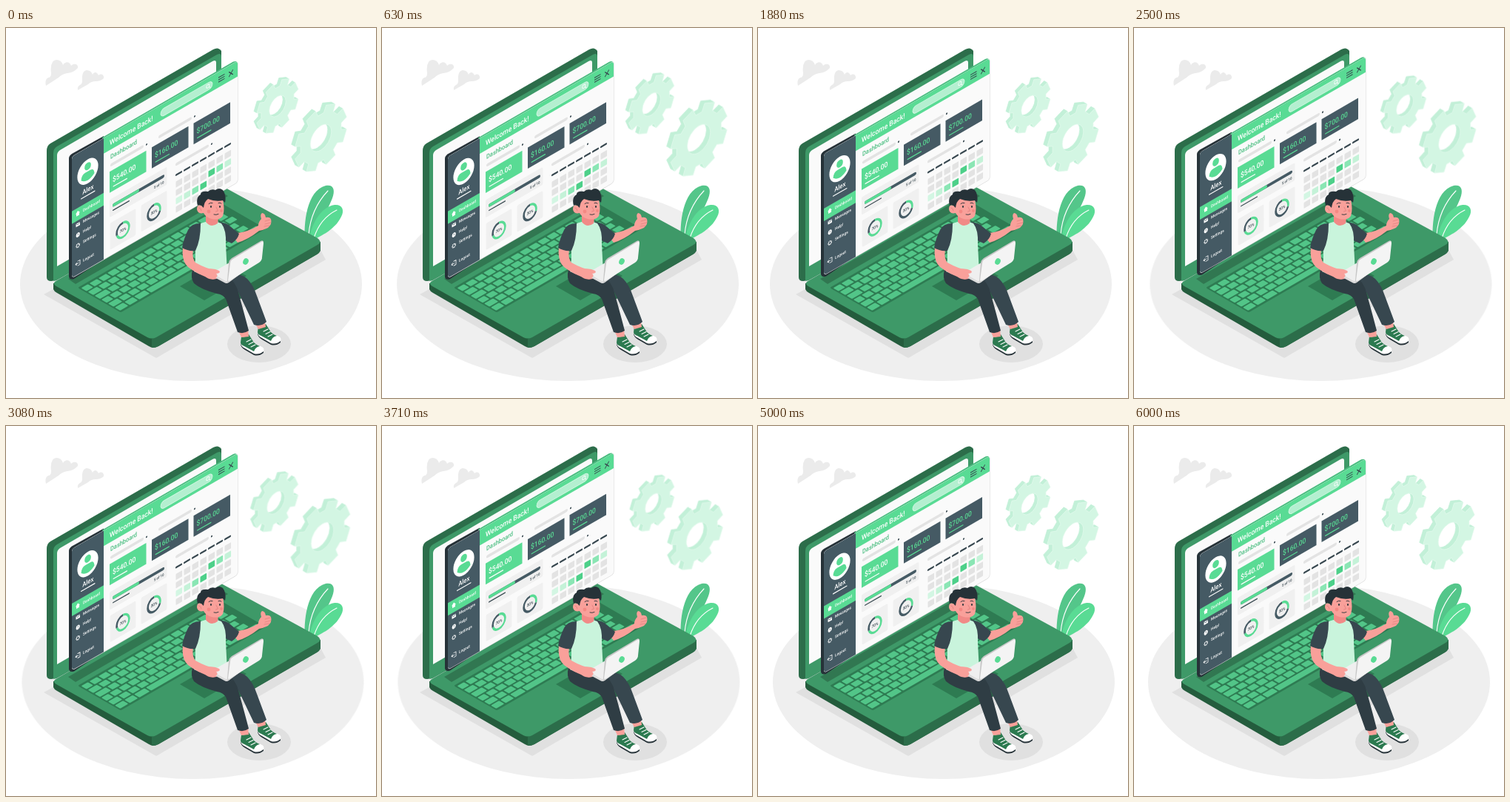
Write an HTML page that moves like this. It is 500x500 px and loops after 6040 ms.

```html
<!DOCTYPE html>
<html lang="en">
<head>
<meta charset="utf-8">
<title>Dashboard on a laptop</title>
<style>
  html, body { margin: 0; width: 100%; height: 100%; overflow: hidden; background: #fff; }
  svg { display: block; width: 100vw; height: 100vh; }
  text { font-family: Roboto, "Open Sans", sans-serif; font-weight: 500; }
  #gears { transform-origin: 397px 130px; }
  .line { fill: none; stroke-linecap: round; stroke-linejoin: round; }
</style>
</head>
<body>
<svg viewBox="0 0 500 500">
  <defs>
    <clipPath id="cardClip"><rect x="89" y="225" width="224" height="164" rx="4"/></clipPath>
  </defs>

  <ellipse id="floor" cx="250" cy="346" rx="231" ry="131" fill="#efefef"/>
  <path fill="#ebebeb" d="M54 78Q52 70 57 67Q61 67 61 61Q59 44 68 43Q75 43 77 50C80 45 86 45 88 51C92 47 98 49 97 54Q92 60 83 61Q76 62 71 67Z"/>
  <path fill="#ebebeb" d="M97 84Q96 79 100 77Q103 76 103 71Q102 58 109 57Q115 57 117 63C119 59 123 59 125 64C128 61 133 63 132 68Q128 72 121 72Q115 72 111 76Z"/>

  <g id="gears"></g>

  <!-- plant -->
  <path fill="#54c68a" d="M404 291C402 264 406 220 432 213C443 211 445 219 441 230C436 242 433 247 429 257C424 272 416 282 406 292Z"/>
  <path fill="#59db94" d="M409 291C411 268 424 242 444 239C454 238 458 246 453 255C449 263 445 267 439 272C430 280 422 281 412 290Z"/>
  <g class="line" stroke="#fff" stroke-width="1.1">
    <path d="M409 279C411 256 419 237 435 220"/>
    <path d="M416 284C421 268 431 254 447 246"/>
  </g>

  <!-- big laptop -->
  <path fill="#e0e0e0" d="M51 360L80 344L425 300L432 313L203 446Z"/>
  <path fill="#245c3d" d="M64 345V353Q65 356 69 358L193 430Q199 434 206 430L420 306Q425 303 425 299V289Z"/>
  <path fill="#2c6d4a" d="M197 420V432Q202 432 206 430L420 306Q425 303 425 299V289Z"/>
  <path fill="#3e9968" d="M69 341L291 213L421 284Q428 289 421 293L203 418Q197 421 191 418L68 349Q61 345 69 341Z"/>
  <path fill="#2c6d4a" d="M55 337V166Q55 159 60 156L280 29Q287 25 291 31V215L68 341L61 342Q55 342 55 337Z"/>
  <path fill="#3e9968" d="M64 341V169Q64 163 69 160L285 36Q291 33 291 39V215L68 341Q65 342 64 341Z"/>
  <path fill="#fafafa" d="M69 322V172Q69 168 73 165L279 45Q284 42 284 47V198Z"/>
  <path fill="#2c6d4a" d="M84 339L290 221L300 227L94 346Z" opacity=".75"/>
  <g id="keys" transform="matrix(1 -.577 1 .577 101 351)"></g>
  <path fill="#2e7b52" d="M235 349L292 316L325 335L268 368Z"/>

  <g id="card">
    <path fill="#263238" d="M85 336V176Q85 173 89 170L132 146V312L92 339Q86 341 85 336Z"/>
    <path fill="#48bd7f" d="M130 148L307 45.500Q312 43.500 313 48L132 153Z"/>
    <g transform="matrix(1 -.577 0 1 0 0)">
      <rect x="89" y="225" width="224.600" height="164.600" rx="4" fill="#dcdcdc"/>
      <g id="ui" clip-path="url(#cardClip)"></g>
    </g>
  </g>

  <!-- person -->
  <ellipse cx="342" cy="427" rx="43" ry="25" fill="#e0e0e0"/>
  <g id="shoes"></g>
  <path fill="#f9a09a" d="M314 409L327 407L328 417L318 418ZM337 400L350 397L351 404L341 407Z"/>
  <path fill="#37474f" d="M290 334Q316 329 326 339Q334 347 339 362L352 397Q345 404 335 401L314 357L280 350Z"/>
  <path fill="#2f3d44" d="M252 326L290 330Q306 337 312 351Q317 367 328 409Q321 414 313 411L297 366Q293 360 285 359Q263 353 254 345Q249 338 252 326Z"/>
  <path fill="#f9a09a" d="M301 275L313 290Q327 286 342 274Q348 273 354 270Q360 265 358 258Q356 255 351 256Q350 250 346 250Q343 252 345 258Q341 262 341 267Q328 275 313 277Z"/>
  <path class="line" stroke="#e2827f" stroke-width=".8" d="M350 261L357 259M350 265L358 263M349 268L356 267"/>
  <path fill="#37474f" d="M287 262Q298 263 303 268L315 278Q313 286 305 291L294 286Z"/>
  <path fill="#c9f4dc" d="M263 264Q278 258 291 264Q298 273 297 292L299 332Q276 340 254 329Q258 308 254 286Z"/>
  <path fill="#f9a09a" d="M239 297L253 300Q251 311 256 317Q270 325 285 328Q290 331 288 335Q285 341 277 339Q257 332 246 323Q237 315 239 297Z"/>
  <path fill="#37474f" d="M263 264Q250 264 246 273Q240 285 238 297Q246 302 256 301Q263 287 263 264Z"/>
  <path fill="#f18a87" d="M270 253L287 257L286 264Q277 271 270 262Z"/>
  <path fill="#f9a09a" d="M267 232Q280 225 293 232Q296 245 293 254Q289 260 278 258Q270 256 267 250Q259 252 258 245Q258 238 264 240Z"/>
  <path fill="#263238" d="M267 243L264 240Q261 238 259 240Q256 229 263 225Q263 220 273 221Q277 217 283 219Q288 215 293 219Q298 226 296 236L293 233Q283 235 273 231Q268 234 267 243Z"/>
  <g fill="#263238">
    <ellipse cx="277" cy="241.500" rx="1" ry="1.400"/>
    <ellipse cx="289" cy="241.500" rx="1" ry="1.400"/>
  </g>
  <g class="line" stroke="#263238" stroke-width=".9">
    <path d="M274 237.500Q276 235.500 279 236.500M287 236.500Q289 235.500 291 237"/>
    <path d="M281 252Q284 253 287 251.500"/>
    <path stroke="#e2827f" d="M284 242L286.500 247L283.500 248M261 243Q264 244 264 247"/>
  </g>
  <g fill="#f48984"><circle cx="274" cy="248" r="2.400"/><circle cx="291" cy="247" r="2"/></g>

  <!-- small laptop -->
  <path fill="#dcdcdc" d="M278 332L302 319L346 311L301 344Q298 346 295 344L278 335Z"/>
  <path fill="#efefef" d="M278 331L302 317V341L297 342Z"/>
  <path fill="#c7c7c7" d="M299 341L301 317Q302 313 305 311L344 288Q347 286 348 289L300 344Z"/>
  <path fill="#f4f4f4" d="M300 341L303 318Q303 314 307 312L345 289Q348 287 348 291L346 310Q346 314 342 317L303 341Q300 343 300 341Z"/>
  <ellipse cx="324" cy="315.500" rx="3.600" ry="4.500" transform="rotate(25 324 315.500)" fill="#59db94"/>
  <path fill="#f9a09a" d="M270 326Q281 324 288 328Q291 331 284 332Q288 335 282 339Q275 341 268 335Z"/>
</svg>

<script>
const LOOP = 6040;
const GREEN = '#59db94', DARK = '#455a64', GREY = '#e3e3e3', ISO = 0.866;
const byId = id => document.getElementById(id);
const times = (n, fn) => Array.from({ length: n }, (_, i) => fn(i)).join('');

const rect = (x, y, w, h, fill, rx = 0) =>
  `<rect x="${x}" y="${y}" width="${w}" height="${h}" rx="${rx}" fill="${fill}"/>`;
const disc = (x, y, r, fill) =>
  `<ellipse cx="${x}" cy="${y}" rx="${r * ISO}" ry="${r}" fill="${fill}"/>`;
const label = (x, y, size, str, fill = '#fff', anchor = 'start') =>
  `<text transform="translate(${x} ${y}) scale(${ISO} 1)" font-size="${size}" fill="${fill}" text-anchor="${anchor}">${str}</text>`;
const stroke = (d, color, width = 1) =>
  `<path class="line" d="${d}" stroke="${color}" stroke-width="${width}"/>`;

// Gears: an extruded outline on the isometric plane
function gearPath(r, hole) {
  const teeth = 8, step = Math.PI * 2 / teeth;
  const profile = [[-0.32, 0.78], [-0.24, 1], [0.24, 1], [0.32, 0.78]];
  const pts = [];
  for (let i = 0; i < teeth; i++)
    for (const [a, k] of profile) {
      const t = (i + a + 0.5) * step;
      pts.push(`${(Math.cos(t) * r * k).toFixed(2)} ${(Math.sin(t) * r * k).toFixed(2)}`);
    }
  return `M${pts.join('L')}ZM${hole} 0A${hole} ${hole} 0 1 0 ${-hole} 0A${hole} ${hole} 0 1 0 ${hole} 0Z`;
}
function gear(x, y, r, hole, depth) {
  const d = gearPath(r, hole);
  const layer = (k, fill, edge) =>
    `<path transform="matrix(.866 -.5 0 1 ${x - k} ${y - k * 0.577})" d="${d}" fill="${fill}" fill-rule="evenodd" stroke="${edge}" stroke-width=".7" stroke-linejoin="round"/>`;
  return times(depth, i => layer(depth - i, '#c3f0d8', '#c3f0d8')) + layer(0, '#d3f6e3', '#e4faee');
}
byId('gears').innerHTML = gear(367, 105.5, 33, 13, 4) + gear(425.5, 148.5, 41, 16.5, 5);

// Keyboard
byId('keys').innerHTML = rect(-2, -2, 196, 58, '#2e7b52', 2) + times(6, row => {
  const y = row * 9.1 + 0.6;
  if (row === 5)
    return [[0, 11], [13, 11], [26, 14], [42, 62], [106, 14], [122, 11], [135, 11], [148, 13], [163, 13], [178, 13]]
      .map(([x, w]) => rect(x, y, w, 7.2, '#52c588', 1)).join('');
  const first = 9 + row % 3 * 3;
  return rect(0, y, first, 7.2, '#52c588', 1) +
    times(14, i => {
      const x = first + 2 + i * 12.2;
      return rect(x, y, Math.min(10.2, 192 - x), 7.2, '#52c588', 1);
    });
});

// Dashboard card; y values are measured before the skew
function ring(x, y, share) {
  const arc = (color, from, len) =>
    `<circle r="9.700" pathLength="100" fill="none" stroke="${color}" stroke-width="3" stroke-dasharray="${len} 100" stroke-dashoffset="${-from}"/>`;
  return rect(x - 17.5, y - 19, 35, 36, '#f0f0f0', 2) +
    `<g transform="translate(${x} ${y}) scale(${ISO} 1) rotate(-90)">${arc(GREEN, 0, share)}${arc(DARK, share, 100 - share)}</g>` +
    label(x, y + 2, 5.4, share + '%', '#37474f', 'middle');
}
const price = (x, str, fill, ink) =>
  rect(x, 275, 49.5, 28.5, fill) + label(x + 4, 291.5, 9.8, str, ink) +
  rect(x + 4.5, 297, 19.5, 1.4, ink, 0.7);
const filter = (x, y) => rect(x, y - 2, 45, 4, GREY, 2) + disc(x + 49, y, 1.2, '#37474f');

const tints = { 14: '#d3f6e3', 15: '#c4f2d8', 16: '#8ae6b4', 17: '#4dd089', 11: '#4dd089', 12: '#8ae6b4', 13: '#c4f2d8' };
const calendar =
  times(7, c => rect(229 + c * 11, 330, 9, 2.5, '#37474f', 1)) +
  times(28, i => rect(229.5 + i % 7 * 11, 340 + Math.floor(i / 7) * 11.3, 8.6, 8.2, tints[i] || GREY, 0.8));

const menu = [['Dashboard', 308.5], ['Messages', 323.5], ['Help!', 337], ['Settings', 351], ['Logout', 376]]
  .map(([str, y]) => label(104, y, 5.5, str)).join('');
const icons =
  `<path fill="#fff" d="M94 306.500L97 303L100 306.500H99V309.500H95V306.500Z"/>` +
  rect(94.5, 319.5, 5.5, 4.4, '#fff', 0.5) + stroke('M95 320L97.200 322L99.500 320', DARK, 0.6) +
  disc(97.2, 335.5, 3, '#fff') + label(97.2, 337.3, 4.6, '?', DARK, 'middle') +
  `<ellipse cx="97.200" cy="350" rx="2" ry="2.300" fill="none" stroke="#fff" stroke-width="1.500" stroke-dasharray="1.400 .5"/>` +
  stroke('M97 371H100V377H97M94 374H98M95.500 372.500L94 374L95.500 375.500', '#fff', 0.8);

byId('ui').innerHTML =
  rect(89, 225, 224, 164, '#fafafa') +
  rect(132, 225, 182, 21, GREEN) +
  rect(89, 225, 43, 165, DARK) +
  // sidebar
  disc(110.5, 257.5, 16.3, '#fff') + disc(110.5, 250.5, 5, GREEN) +
  `<path fill="${GREEN}" d="M101.500 265Q102 257.500 107 257.500H114Q119 257.500 119.500 265Q115 269.500 110.500 269.500T101.500 265Z"/>` +
  label(110.8, 285, 9, 'Alex', '#fff', 'middle') + rect(101, 288.8, 19.5, 1.3, '#fff', 0.6) +
  rect(89, 299, 43, 17, GREEN) + menu + icons +
  // header
  label(140, 239.5, 9.8, 'Welcome Back!') +
  `<rect x="209" y="231.500" width="70" height="10" rx="5" fill="#b4efd0" stroke="#d8f8e6" stroke-width=".8"/>` +
  stroke('M274.500 238L276 239.500', '#fff', 0.8) +
  `<ellipse cx="272.800" cy="236" rx="2" ry="2.300" fill="none" stroke="#fff" stroke-width=".8"/>` +
  times(3, i => rect(287, 232.2 + i * 3, 8.5, 1.1, '#37474f')) +
  stroke('M301.500 233.500L306.500 239.500M306.500 233.500L301.500 239.500', '#37474f', 1.1) +
  // content
  label(141, 258.5, 8.6, 'Dashboard', '#48bd7f') +
  filter(141, 267) + filter(206, 266.5) + filter(229, 317) +
  price(140, '$540.00', GREEN, '#fff') +
  price(197, '$160.00', DARK, GREEN) +
  price(253.5, '$700.00', DARK, GREEN) +
  rect(140, 313, 77.5, 24, '#f0f0f0', 2) +
  rect(144, 321, 70, 4.2, DARK, 2) + rect(144, 321, 36, 4.2, GREEN, 2) +
  rect(144, 329, 23, 1.4, '#37474f', 0.7) +
  label(213.5, 333, 5, '5 of 10', '#37474f', 'end') +
  ring(158, 364, 70) + ring(200, 364, 30) + calendar;

// Shoes
const shoe = (x, y) => `<g transform="translate(${x} ${y})">
  <path fill="#263238" d="M0 9Q0 15 6 18L18 25Q25 27 31 22L31 19L2 8Z"/>
  <path fill="#fff" d="M0 8Q0 13 6 16L18 23Q25 25 31 20Q33 15 27 13L3 6Z"/>
  <path fill="#2c7a50" d="M1 0Q6 2 11 -3L18 8Q22 12 26 13Q20 14 18 20L5 13Q0 11 0 8Z"/>
  ${stroke('M8 7L14 4M11 10.500L17 7.500M14 14L20 11', '#fff', 1.1)}</g>`;
byId('shoes').innerHTML = shoe(340, 403) + shoe(317, 417);

// Motion: [ms, value]
const lift = [[0, 0], [310, .5], [630, .2], [1250, -1.6], [1880, -3.6], [2500, -5.6], [3130, -7.7],
  [3460, -8.5], [3780, -8.4], [4400, -6.2], [5020, -4], [5650, -1.8], [LOOP, 0]];
const pulse = [[0, 1], [580, 1.1], [1170, 1.04], [1600, 1], [2350, 1], [2850, 1.1], [3170, 1.065], [3750, 1], [LOOP, 1]];
const sway = [[0, 0], [1170, 2], [1880, -3], [2500, 2.5], [3710, 2.4], [5000, 1], [LOOP, 0]];

function play(id, steps, toTransform) {
  const frames = steps.map(([t, v]) => ({ offset: t / LOOP, transform: toTransform(v) }));
  const run = byId(id).animate(frames, { duration: LOOP, iterations: Infinity });
  run.startTime = document.timeline.currentTime;
}
play('card', lift, v => `translateY(${v}px)`);
play('gears', pulse, v => `scale(${v})`);
play('floor', sway, v => `translateX(${v}px)`);
</script>
</body>
</html>
```
